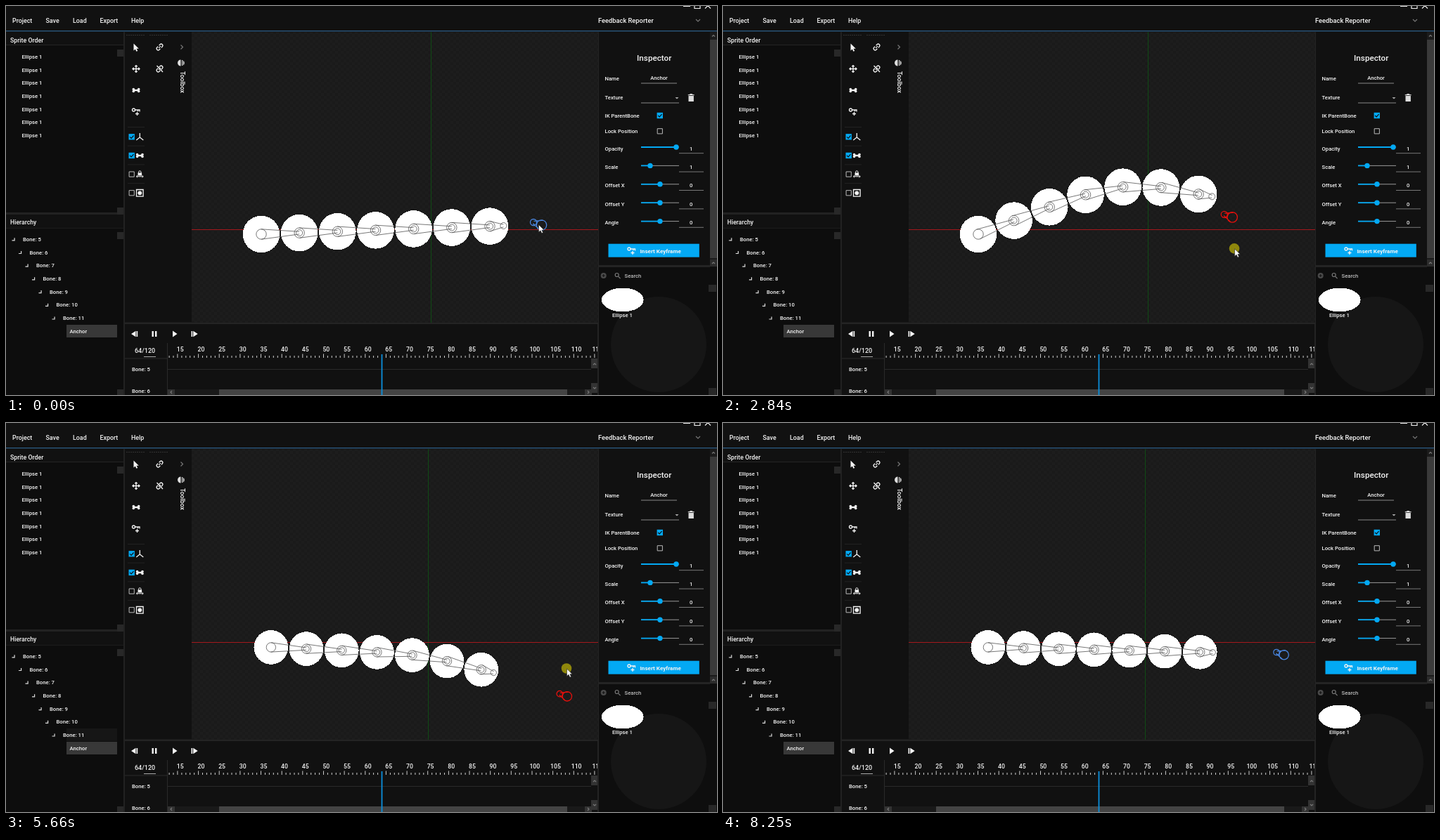
These frames come from a looping animation (1011 by 554 pixels, 8330 ms). An HTML page:

```html
<!DOCTYPE html>
<html lang="en">
<head>
<meta charset="utf-8">
<title>Bone editor</title>
<style>
  html, body { margin: 0; width: 100%; height: 100%; overflow: hidden; background: #111; }
  svg { display: block; width: 1011px; height: 554px; font: 500 7.7px Roboto, Arial, sans-serif; fill: #f4f4f4; }
  .ico { fill: none; stroke: #f4f4f4; stroke-width: 1.3; }
  .dim { fill: none; stroke: #777; stroke-width: 1.2; }
  .crisp { shape-rendering: crispEdges; }
</style>
</head>
<body>
<svg viewBox="0 0 1011 554">
  <defs>
    <pattern id="check" width="8" height="8" patternUnits="userSpaceOnUse">
      <rect width="8" height="8" fill="#1d1d1d"/>
      <path d="M0 0h4v4h-4zM4 4h4v4h-4z" fill="#1a1a1a"/>
    </pattern>
    <clipPath id="view"><rect x="264" y="37" width="578" height="414"/></clipPath>
    <clipPath id="ruler"><rect x="230" y="480" width="612" height="74"/></clipPath>
  </defs>
  <g id="ui"></g>
  <g clip-path="url(#view)">
    <rect x="264" y="37" width="578" height="414" fill="url(#check)"/>
    <path id="axisY" class="crisp" stroke="#0f4a14"/>
    <path id="axisX" class="crisp" stroke="#a3181c"/>
    <path id="balls" class="crisp" fill="#fff"/>
    <path id="bones" fill="none" stroke="#555" stroke-width=".8"/>
    <path id="anchor" fill="none" stroke-width="1.3"/>
  </g>
  <g id="cursor">
    <circle id="press" r="7.3" fill="#8f870c"/>
    <path d="M.5 .5V11L3 8.8 4.8 12.6 6.6 11.8 4.9 8.1H8.2Z" fill="#fff" stroke="#222" stroke-width=".6"/>
  </g>
</svg>
<script>
const $ = id => document.getElementById(id);
const BLUE = '#03a9f4';
let out = '';

// ---- static interface ----
const rect = (x, y, w, h, fill) => out += `<rect x="${x}" y="${y}" width="${w}" height="${h}" fill="${fill}"/>`;
const path = (d, attr = 'class="ico"') => out += `<path d="${d}" ${attr}/>`;
const disc = (x, y, r, fill) => out += `<circle cx="${x}" cy="${y}" r="${r}" fill="${fill}"/>`;
const text = (s, x, y, size = 7.7, attr = '') => out += `<text x="${x}" y="${y}" font-size="${size}" ${attr}>${s}</text>`;
const mid = 'text-anchor="middle"';
const solid = 'fill="#f4f4f4"';

function checkbox(x, y, on) {
  if (on) {
    rect(x - 4.2, y - 4.2, 8.4, 8.4, BLUE);
    path(`M${x - 2.6} ${y}l2 2 3.4-3.8`, 'fill="none" stroke="#111" stroke-width="1.2"');
  } else {
    path(`M${x - 3.6} ${y - 3.6}h7.2v7.2h-7.2z`, 'fill="none" stroke="#bbb"');
  }
}
function boneIcon(x, y) {
  path(`M${x - 3} ${y}h6`, 'stroke="#f4f4f4" stroke-width="2.4"');
  for (const sx of [-3.7, 3.7]) for (const sy of [-1.5, 1.5]) disc(x + sx, y + sy, 1.8, '#f4f4f4');
}
function keyIcon(x, y) {
  path(`M${x - 1} ${y - 2}h6.5v2.5M${x + 3} ${y - 2}v2.2M${x - .5} ${y + 3.5}h5M${x + 2} ${y + 1}v5`);
  out += `<circle cx="${x - 3}" cy="${y - 2}" r="2" class="ico"/>`;
}
function linkIcon(x, y, cut) {
  out += `<g transform="translate(${x} ${y}) rotate(-45)"><path class="ico" d="M-1-2.2h-2a2.2 2.2 0 0 0 0 4.4h2M1-2.2h2a2.2 2.2 0 0 1 0 4.4h-2M-2 0h4"/></g>`;
  if (cut) path(`M${x - 4} ${y - 4.5}l8.5 9`);
}

function menuBar() {
  rect(0, 0, 1011, 36, '#111');
  [['Project', 9], ['Save', 56.5], ['Load', 95], ['Export', 133.5], ['Help', 178]].forEach(([s, x]) => text(s, x, 24, 8.9));
  text('Feedback Reporter', 842, 24.3, 9.3);
  path('M981 19l3 3 3-3', 'class="dim"');
  path('M963 .5h10M979 0v3.5h8V0M994 3.5l4-4 4 4', 'fill="none" stroke="#eee" stroke-width="1.2"');
}

function leftPanels() {
  rect(0, 37, 167, 517, '#0d0d0d');
  rect(0, 37, 167, 18, '#111');
  rect(0, 55, 167, 1, '#242424');
  rect(0, 294, 168, 3, '#222');
  rect(0, 297, 167, 19, '#111');
  rect(0, 316, 167, 1, '#1c1c1c');
  text('Sprite Order', 6, 51.5, 8.8);
  text('Hierarchy', 6, 311, 8.7);
  for (let i = 0; i < 7; i++) text('Ellipse 1', 22.5, 74.8 + 18.7 * i);
  [62, 287, 322, 546].forEach(y => rect(158, y, 10, 10, '#282828'));
  out += '<rect id="hover" x="86" y="435" width="72" height="18" fill="#161616"/>';
  for (let i = 0; i < 7; i++) {
    const x = 24 + 9.5 * i, y = 334.8 + 18.7 * i;
    text('Bone: ' + (i + 5), x, y);
    path(`M${x - 15.5} ${y - 1}h3.6v-3.6`, 'fill="none" stroke="#ddd" stroke-width="1.2"');
  }
  rect(86, 454, 72, 18, '#383838');
  text('Anchor', 90.5, 466);
}

function toolbox() {
  rect(167, 37, 2, 517, '#222');
  rect(169, 37, 95, 414, '#111');
  path('M171 41.5h27M204 41.5h27', 'stroke="#333" stroke-dasharray="2 1"');
  for (let i = 0; i < 4; i++) path(`M173 ${172.5 + 26.7 * i}h24`, 'stroke="#222"');
  path('M181.5 53.5v10l2.3-2 1.6 3.3 1.8-.9-1.6-3.2h3.2z', solid);
  linkIcon(218.5, 58.5);
  linkIcon(218.5, 89.5, true);
  path('M180.5 89.5h9M185 85v9M183.3 86.3l1.7-1.7 1.7 1.7M183.3 92.7l1.7 1.7 1.7-1.7M181.7 87.8l-1.7 1.7 1.7 1.7M188.3 87.8l1.7 1.7-1.7 1.7');
  boneIcon(185, 120);
  keyIcon(184.5, 150);
  for (let i = 0; i < 4; i++) checkbox(178.7, 186.3 + 26.65 * i, i < 2);
  path('M190.3 181v6l-5 4M190.3 187l5 4');
  boneIcon(190.3, 213);
  rect(187.5, 237.5, 5.6, 4, '#f4f4f4');
  path('M188.6 238v-1.5a1.7 1.7 0 0 1 3.4 0V238M185.5 242.8h9.6M187 241.3l-1.6 1.5 1.6 1.5M193.6 241.3l1.6 1.5-1.6 1.5', 'fill="none" stroke="#f4f4f4"');
  path('M185.5 261.5h9.6v9.6h-9.6z');
  disc(190.3, 266.3, 2.9, '#f4f4f4');
  path('M248.5 55.5l3 3-3 3', 'class="dim"');
  path('M248.5 76.5a4.5 4.5 0 0 0 0 9zM250 77h1.2v8H250zM252 77.8a4 4 0 0 1 0 6.6z', 'fill="#ddd"');
  text('Toolbox', 0, 0, 8.8, 'transform="translate(248.3 93) rotate(90)"');
}

function inspector() {
  rect(842, 37, 159, 332, '#111');
  rect(1001, 37, 10, 334, '#1b1b1b');
  rect(1001, 48, 10, 311, '#3a3a3a');
  rect(1001, 361, 10, 10, '#2c2c2c');
  path('M1004 43.5l2-2 2 2M1004 367l2-2 2 2', 'class="dim"');
  text('Inspector', 921.7, 78, 11.7, mid);
  [['Name', 105.8], ['Texture', 133.3], ['IK ParentBone', 158.6], ['Lock Position', 181]].forEach(([s, y]) => text(s, 851.5, y));
  text('Anchor', 928.5, 105.3, 7.7, mid);
  path('M903 110h51M903 138h54', 'stroke="#888"');
  path('M951.5 130h5l-2.5 2.5z', 'fill="#aaa"');
  path('M970.5 128h7.4v8h-7.4zM969.8 126h8.8v1.3h-8.8zM972.3 125h3.8v1h-3.8z', 'fill="#ddd"');
  checkbox(929.8, 156, true);
  checkbox(929.8, 178.3, false);
  [['Opacity', 953, 1], ['Scale', 916, 1], ['Offset X', 930, 0], ['Offset Y', 930, 0], ['Angle', 930, 0]].forEach(([s, x, v], i) => {
    const y = 201 + 26.4 * i;
    text(s, 851.5, y + 4.6);
    path(`M903 ${y}h54`, 'stroke="#999"');
    path(`M903 ${y}H${x}`, `stroke="${BLUE}" stroke-width="1.8"`);
    disc(x, y, 3.7, BLUE);
    text(v, 974.3, y + 4.6, 7.7, mid);
    path(`M957 ${y + 8.7}h35`, 'stroke="#777"');
  });
  rect(856.5, 338.7, 129.3, 19, BLUE);
  keyIcon(889, 348);
  text('Insert Keyframe', 901.5, 352, 8.1, 'font-weight="700"');
}

function assets() {
  rect(842, 372, 169, 182, '#0e0e0e');
  rect(842, 369, 159, 3, '#242424');
  disc(928, 482, 68, '#161616');
  disc(849.7, 384, 4, '#4a4a4a');
  path('M847.7 384h4M849.7 382v4', 'stroke="#111"');
  path('M871 385.5l2.6 2.6M871.2 383a2.5 2.5 0 1 1-5 0 2.5 2.5 0 0 1 5 0', 'class="dim"');
  text('Search', 879.5, 387, 7.7, 'fill="#bbb"');
  out += '<ellipse class="crisp" cx="876.8" cy="418.5" rx="29.8" ry="17" fill="#fff"/>';
  text('Ellipse 1', 876.5, 442.8, 7.7, mid);
  rect(999, 397, 11, 10, '#282828');
  rect(999, 544, 11, 10, '#282828');
}

function timeline() {
  rect(169, 451, 673, 103, '#111');
  rect(169, 450.5, 673, 2.5, '#242424');
  path('M184.5 462.7v8.6l-6.5-4.3zM185.5 463h1.7v8h-1.7zM207.5 463h2.4v8h-2.4zM212 463h2.4v8H212zM237 462.5v9l6.5-4.5zM263.5 463h1.7v8h-1.7zM266.2 462.7v8.6l6.5-4.3z', solid);
  text('64/120', 183, 494.3, 9);
  path('M196 499.5h17', 'stroke="#aaa"');
  path('M169 502h60M229.5 480v74M230 517.5h602', 'stroke="#2a2a2a"');
  text('Bone: 5', 179, 520.3);
  text('Bone: 6', 179, 551);
  out += '<g clip-path="url(#ruler)">';
  let ticks = '';
  for (let n = 13; n < 117; n++) {
    const x = (534.5 + (n - 64) * 5.93).toFixed(1);
    ticks += `M${x} 501V${n % 5 ? 498 : 495.5}`;
    if (n % 5 === 0 && n > 14) text(n, 247.8 + (n - 15) * 5.93, 492.3, 8.7, mid);
  }
  path(ticks, 'stroke="#ccc"');
  out += '</g>';
  rect(230, 546, 603, 8, '#191919');
  rect(303, 546, 495, 8, '#444');
  [[230, 546], [823, 546], [832, 502], [832, 537]].forEach(([x, y]) => rect(x, y, 10, y > 540 ? 8 : 14, '#333'));
  path('M835 511l2-2 2 2M835 543l2 2 2-2M236 548l-2 2 2 2M827 548l2 2-2 2', 'class="dim"');
  path('M534.5 496V554', 'stroke="#0a90dc" stroke-width="1.8"');
}

menuBar(); leftPanels(); toolbox(); inspector(); assets(); timeline();
rect(841, 37, 2, 517, '#242424');
rect(0, 35, 1011, 1.2, '#2d5f8a');
$('ui').innerHTML = out;

// ---- motion ----
const LOOP = 8330, GRAB = 150, DROP = 7810, ZOOM = 4440, LAG = 80, LEAVE = 7840;
const HALF_SWING = 555;

// time, pointer x and y, angle of the first bone, total bend, how late along the chain it bends
const keys = [
  [150, 757, 311, -2, 0, 1],
  [450, 735, 190, -16, -8, 1],
  [1530, 707, 195, -18, -12, .85],
  [2840, 727, 345, -21, 31, 2],
  [3980, 765, 425, 0, 22, 1.5],
  [4300, 600, 190, -15, -50, 1.5],
  [4600, 397, 136, -4.6, -143, 1.5],
  [4900, 120, 442, -100, -110, 1.5],
  [5400, 770, 445, 0, 16, 2],
  [5660, 797, 350, 2.5, 11.5, 2.4],
  [6060, 560, 100, -22, -50, 1],
  [6430, 324, 90, -28, -105, .85],
  [6540, 342, 66, -30, -113, .8],
  [6960, 610, 150, -5, -60, 1],
  [7690, 794, 329.5, 1.3, 0, 1]
];
// regular swings down and up
for (let i = 0; i < 6; i++) {
  const t = 784 + HALF_SWING * i;
  keys.push(i % 2 ? [t, 694, 120, -26, -8, 1] : [t, 738, 400, -8, 26, 1.5]);
}
keys.sort((a, b) => a[0] - b[0]);

// monotone cubic through the keys
function sample(t) {
  const last = keys.length - 1;
  if (t <= keys[0][0]) return keys[0].slice(1);
  if (t >= keys[last][0]) return keys[last].slice(1);
  const i = keys.findIndex(r => r[0] > t) - 1;
  const a = keys[i], b = keys[i + 1], h = b[0] - a[0], u = (t - a[0]) / h, w = 1 - u;
  const rate = (j, c) => j < 0 || j >= last ? 0 : (keys[j + 1][c] - keys[j][c]) / (keys[j + 1][0] - keys[j][0]);
  const slope = (j, c) => {
    const p = rate(j - 1, c), q = rate(j, c);
    return p * q > 0 ? 2 * p * q / (p + q) : 0;
  };
  return a.slice(1).map((v, k) => {
    const c = k + 1;
    return v * w * w * (1 + 2 * u) + b[c] * u * u * (3 - 2 * u) + h * u * w * (w * slope(i, c) - u * slope(i + 1, c));
  });
}

const smooth = u => u * u * (3 - 2 * u);
const ring = (x, y, r) => `M${x - r} ${y}a${r} ${r} 0 1 0 ${2 * r} 0a${r} ${r} 0 1 0 ${-2 * r} 0`;

function bone(x, y, ex, ey, k) {
  const len = Math.hypot(ex - x, ey - y), nx = (y - ey) / len, ny = (ex - x) / len;
  const R = 7.2 * k, r = 4.5 * k, tip = 1.8 * k;
  const side = s => `M${x + s * nx * R} ${y + s * ny * R}L${ex + s * nx * tip} ${ey + s * ny * tip}`;
  return ring(x, y, R) + ring(ex, ey, r) + side(1) + side(-1);
}

function draw(t) {
  const k = t < ZOOM ? 1 : .927;
  const zx = x => 553 + (x - 553) * k, zy = y => 249 + (y - 249) * k;
  $('axisY').setAttribute('d', `M${zx(604)} 37V451`);
  $('axisX').setAttribute('d', `M264 ${zy(318)}H842`);

  const [px, py, base, bend, late] = sample(t);
  let x = zx(363), y = zy(325), balls = '', bones = '';
  for (let i = 0; i < 7; i++) {
    const turn = smooth(Math.min(1, i / 5) ** late);
    const len = (i < 6 ? 54.2 : 19.4) * k, a = (base + bend * turn) * Math.PI / 180;
    const ex = x + len * Math.cos(a), ey = y + len * Math.sin(a);
    balls += ring(x, y, 26.3 * k);
    bones += bone(x, y, ex, ey, k);
    x = ex; y = ey;
  }
  $('balls').setAttribute('d', balls);
  $('bones').setAttribute('d', bones);

  const held = t >= GRAB && t < DROP;
  const [ax, ay] = sample(t - LAG);
  const sx = ax - 7, sy = ay - 3;
  $('anchor').setAttribute('d', bone(sx + 11.5 * k, sy + 4 * k, sx, sy, k));
  $('anchor').setAttribute('stroke', held ? '#e8100c' : '#4a86e0');

  const away = smooth(Math.min(1, Math.max(0, (t - LEAVE) / 330)));
  $('cursor').setAttribute('transform', `translate(${px + 230 * away} ${py + 232 * away})`);
  $('press').style.display = held ? '' : 'none';
  $('hover').style.display = t > 4850 && t < 6060 ? '' : 'none';
}

const start = performance.now();
function tick(now) {
  draw(Math.max(0, now - start) % LOOP);
  requestAnimationFrame(tick);
}
draw(0);
requestAnimationFrame(tick);
</script>
</body>
</html>
```
